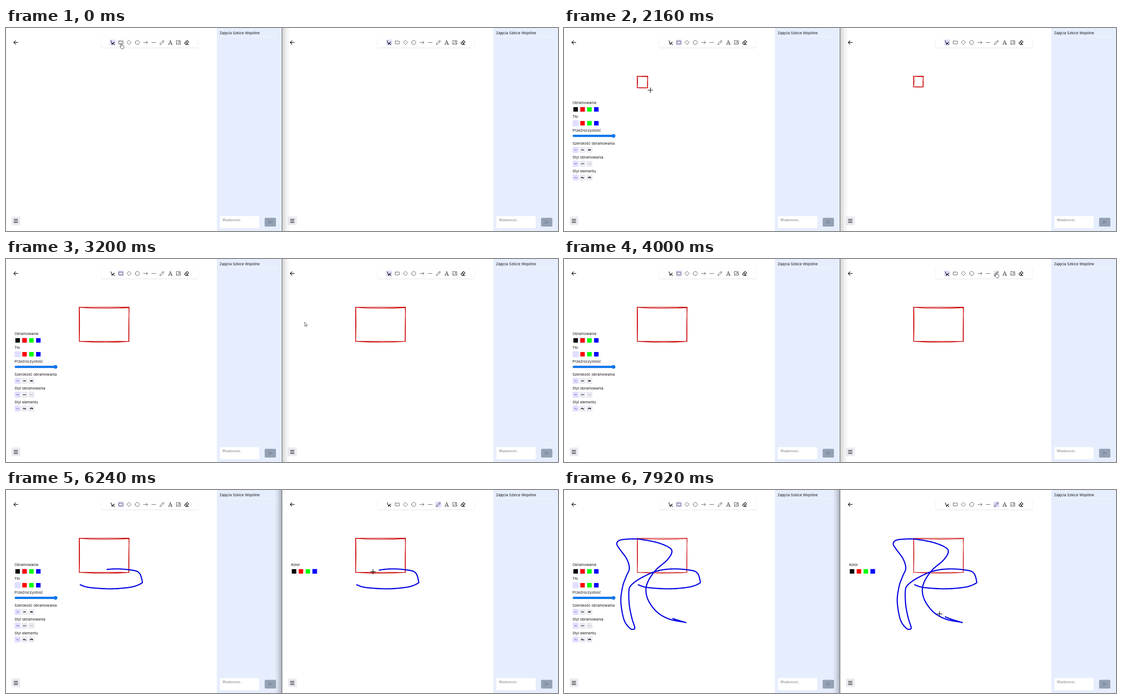
An HTML page that plays this animation: 1233 px wide and 454 px high, repeating every 8000 ms.

```html
<!DOCTYPE html>
<html lang="pl">
<head>
<meta charset="utf-8">
<title>Tablica</title>
<style>
html, body { margin: 0; width: 100%; height: 100%; overflow: hidden; background: #fff; }
svg { display: block; width: 1233px; height: 454px; }
text { font-family: Inter, "Open Sans", sans-serif; fill: #16161a; }
.icon { fill: none; stroke: #222; stroke-width: .75; stroke-linecap: round; stroke-linejoin: round; }
.bold { stroke: #000; stroke-width: 1.15; }
.violet { stroke: #5b57a2; }
</style>
</head>
<body>
<svg id="stage" viewBox="0 0 1233 454" xmlns="http://www.w3.org/2000/svg"></svg>
<script>
const LOOP = 8000, STEP = 80, SHIFT = 617.4;
const LILAC = '#e0dfff', GREY = '#ebebf2', BLUE = '#0d74ec';
const COLORS = ['#000', '#f00', '#0f0', '#00f'];
const stage = document.getElementById('stage');
const $ = id => document.getElementById(id);

// ---------- markup helpers ----------
const rect = (x, y, w, h, fill, more = '') =>
  `<rect x="${x}" y="${y}" width="${w}" height="${h}" fill="${fill}" ${more}/>`;
const tile = (cx, cy, fill, id = '') =>
  rect(cx - 6.7, cy - 6.7, 13.4, 13.4, fill, `rx="1.8" ${id && `id="${id}"`}`);
const label = (x, y, size, s, more = '') =>
  `<text x="${x}" y="${y}" font-size="${size}" ${more}>${s}</text>`;
const icon = (cx, cy, d, cls = '', more = '') =>
  `<path class="icon ${cls}" transform="translate(${cx} ${cy})" d="${d}" ${more}/>`;

const col = i => 26 + 15.4 * i;
const toolX = i => 238.2 + 18.36 * i;

const TOOLS = [
  ['M-3.8-4L-1 4.6L.5 1L4 5M.5 1L4.2-.8Z', 'bold'],
  ['M-4-3.2H4Q4.6-3.2 4.6-2.6V2.6Q4.6 3.2 4 3.2H-4Q-4.6 3.2-4.6 2.6V-2.6Q-4.6-3.2-4-3.2Z'],
  ['M0-4.8L4.8 0L0 4.8L-4.8 0Z'],
  ['M-4.6 0A4.6 4.6 0 1 1 4.6 0A4.6 4.6 0 1 1-4.6 0Z'],
  ['M-4.6 0H4.6M1.4-3.2L4.6 0L1.4 3.2'],
  ['M-4.6 0H4.6'],
  ['M-4.4 4.5L-3.8 1.6L2.3-4.3Q3.2-4.9 4.2-3.9Q4.9-3 4.2-2.2L-1.7 3.8ZM1-3L3-1'],
  ['M-4.4 4.4H-1.6M-3.2 4.4L0-4.6L3.2 4.4M.2-4.6L4 4.4M1 4.4H4.6M-2.2 1.4H2'],
  ['M-3.8-4.4H3.8Q4.5-4.4 4.5-3.7V3.7Q4.5 4.4 3.8 4.4H-3.8Q-4.5 4.4-4.5 3.7V-3.7Q-4.5-4.4-3.8-4.4ZM-4.3 3L-1.4.2L.6 2.2L2.2.8L4.4 2.8M.8-1.7A1 1 0 1 1 2.8-1.7A1 1 0 1 1 .8-1.7'],
  ['M-4.4 1L1.2-4.5L4.5-1.2L-.8 4.3H-2.2L-4.6 1.7ZM-2-1.4L1.8 2.2M-1 4.4H4.2', 'bold']
];

const swatches = (y, from, id) => COLORS.map((c, i) => i < from ? '' :
  (id ? tile(col(i), y, 'none', id + i) : '') + rect(col(i) - 5, y - 5, 10, 10, c)).join('');

function win(n) {
  const tools = TOOLS.map(([d, cls], i) =>
    tile(toolX(i), 32.4, 'none', `tool${n}_${i}`) + icon(toolX(i), 32.4, d, cls)).join('');
  return `<g transform="translate(${n * SHIFT} 0)">
    ${rect(471, 0, 145.2, 454, '#e6eefd')}
    ${label(477, 14.4, 8, 'Zajęcia Szkice Wspólne')}
    ${rect(477, 19, 130, 1, '#f3f6fe')}
    ${rect(478, 420.8, 87.5, 27, '#fff', 'rx="1.5"')}
    ${label(483.6, 432.2, 7.2, 'Wiadomość..', 'style="fill:#757575"')}
    ${rect(577.8, 424.4, 25.2, 19.6, '#94a1b5', 'rx="2.6"')}
    ${icon(590.4, 434.2, 'M-3.4-3.6L4.2 0L-3.4 3.6L-2.4 0ZM-2.4 0H1', '', 'style="stroke:#6c7789"')}
    ${icon(22, 32.4, 'M4.6 0H-4.4M-.6-4L-4.6 0L-.6 4', 'bold')}
    ${rect(12.4, 421.6, 19.6, 19.4, GREY, 'rx="1.5"')}
    ${icon(22, 431.5, 'M-4.2-3.4H4.2M-4.2 0H4.2M-4.2 3.4H4.2', 'bold')}
    ${rect(212.7, 21.5, 215.8, 22, '#fff', 'rx="3" filter="url(#soft)"')}
    ${tools}</g>`;
}

function leftPanel() {
  const row = (y, items) => items.map(([d, cls, more], i) =>
    tile(col(i), y, i ? GREY : LILAC) + icon(col(i), y, d, cls, more)).join('');
  const line = 'M-2.8 0H2.8', wave = 'M-3.2 1.2Q-1.4-2 0 0T3.2.4';
  const w = (n, more = '') => `style="stroke-width:${n};stroke-linecap:butt;${more}"`;
  return `<g id="panel0">
    ${label(19, 170.4, 8.15, 'Obramowanie')}${swatches(182, 0, 'ring0_')}
    ${label(19, 201.2, 8.15, 'Tło')}${tile(26, 213, LILAC)}${swatches(213, 1)}
    ${label(19, 232, 8.15, 'Przeźroczystość')}
    ${rect(19.4, 238.8, 95, 5, BLUE, 'rx="2.5"')}
    <circle cx="110.6" cy="241.3" r="4.1" fill="${BLUE}"/>
    ${label(19, 261, 8.15, 'Szerokość obramowania')}
    ${row(272.6, [[line, 'violet', w(.9)], [line, 'bold', w(1.5)], [line, 'bold', w(2.2)]])}
    ${label(19, 291.8, 8.15, 'Styl obramowania')}
    ${row(303.5, [[line, 'violet', w(1.2)], ['M-3.2 0H3.2', 'bold', w(1.3, 'stroke-dasharray:1.7 .7')],
      ['M-3.6 0H3.6', '', w(.9, 'stroke:#667;stroke-dasharray:1 1')]])}
    ${label(19, 322.6, 8.15, 'Styl elementu')}
    ${row(334.4, [[wave, 'violet', w(1)], [wave, 'bold', w(1.4)], ['M-3 1.4Q-1.6-1.8.8-1T2.8 1.2M.2.2H3', 'bold', w(1.5)]])}
  </g>`;
}

const rightPanel = () => `<g id="panel1" transform="translate(${SHIFT} 0)">
  ${label(19.3, 170.4, 8.15, 'Kolor')}${swatches(182, 0, 'ring1_')}</g>`;

const drawing = n => `<g transform="translate(${n * SHIFT} 0)" fill="none" stroke-linecap="round" stroke-linejoin="round">
  <path id="box${n}" stroke="#cc0808"/><path id="ink${n}" stroke="#0505e2" stroke-width="2.6"/></g>`;

const fade = (id, a, b) => `<linearGradient id="${id}"><stop offset="0" stop-color="#000" stop-opacity="${a}"/>
  <stop offset=".5" stop-color="#000" stop-opacity="${(a + b) / 3}"/><stop offset="1" stop-color="#000" stop-opacity="${b}"/></linearGradient>`;

stage.innerHTML = `<defs>
  <filter id="soft" x="-5%" y="-40%" width="110%" height="180%">
    <feDropShadow dx="0" dy=".8" stdDeviation="1.3" flood-color="#000" flood-opacity=".16"/></filter>
  ${fade('fadeRight', .18, 0)}${fade('fadeLeft', 0, .26)}</defs>
  ${rect(0, 0, 1233, 454, '#fff')}${win(0)}${win(1)}${leftPanel()}${rightPanel()}${drawing(0)}${drawing(1)}
  ${rect(617, 0, 18, 454, 'url(#fadeRight)', 'id="shadeRight"')}
  ${rect(600, 0, 16, 454, 'url(#fadeLeft)', 'id="shadeLeft"')}
  ${rect(616, 0, 1, 454, '#555')}
  <g id="cursor">
    <path id="hand" d="M-1 1V6.5L-2.2 5.3Q-3.2 5-3 6L-.8 9.6Q0 11 1.5 11H3.6Q5.6 11 5.7 8.8V5.2Q5.5 4 4.6 4.4Q4 3.4 3 4Q2.2 3.2 1.2 3.8V1Q.2-.4-1 1Z" fill="#fff" stroke="#222" stroke-width=".8"/>
    <path id="cross" d="M-6 0H6M0-6V6" stroke="#000" stroke-width="1.2"/>
    <path id="arrow" d="M0 0V9.2L2.1 7.3L3.4 10.2L4.8 9.6L3.5 6.8H6.4Z" fill="#fff" stroke="#333" stroke-width=".8"/>
  </g>`;

// ---------- motion ----------
// time, x, y, pointer shape until the next key
const POINTER = [
  [0, 257.5, 35.5, 'hand'], [240, 257.5, 35.5, 'hand'], [320, 245, 50, 'cross'], [560, 130, 130, 'cross'],
  [800, 45, 179, 'hand'], [960, 41.5, 182, 'hand'], [1280, 41.5, 182, 'hand'], [1360, 62, 168, 'cross'],
  [1680, 163.5, 108, 'cross'], [2080, 163.5, 108, 'cross'], [2160, 193, 139, 'cross'],
  [2400, 240, 167, 'cross'], [2720, 275, 183.5, 'cross'], [2880, 275, 183.5, 'cross'],
  [3040, 440, 165, 'arrow'], [3200, 667, 141, 'arrow'], [3440, 770, 122, 'arrow'], [3760, 930, 60, 'arrow'],
  [3920, 965.5, 33, 'hand'], [4000, 965.5, 31, 'hand'], [4240, 965.5, 31, 'hand'], [4320, 945, 50, 'cross'],
  [4720, 790, 135, 'cross'], [5040, 692.5, 185, 'hand'], [5280, 692.5, 187, 'hand'],
  [5440, 692.5, 187, 'hand'], [5520, 745, 201, 'cross'], [5600, 783.4, 212, 'cross']
];

const STROKE = [
  [166, 212], [186, 218], [235, 221], [280, 217], [302, 209], [304, 203], [298, 186], [283, 179.5],
  [243, 176.5], [205, 182], [170, 198], [150, 213], [145, 226], [146, 258], [152, 288], [158, 307],
  [155, 311.5], [147, 309], [134, 290], [127, 250], [131, 216], [139, 193], [146, 175], [140, 154],
  [125, 133], [118, 121], [123, 113], [140, 110], [167, 110], [206, 117], [234, 128], [241, 139],
  [230, 157], [205, 179], [188, 204], [183, 226], [190, 250], [209, 274], [236, 289], [268.5, 295.5],
  [268.5, 295.5], [242, 287], [221.5, 277.2]
];
// time, position of the pen as a point index
const PEN = [[5600, 0], [6400, 11.3], [6960, 21.1], [7280, 27.2], [7920, 42]];
const FINE = 12;

function spline(p) {
  const out = [], at = i => p[Math.max(0, Math.min(p.length - 1, i))];
  for (let i = 0; i < p.length - 1; i++)
    for (let k = 0; k < FINE; k++) {
      const u = k / FINE;
      out.push([0, 1].map(c => {
        const [a, b, d, e] = [at(i - 1)[c], at(i)[c], at(i + 1)[c], at(i + 2)[c]];
        return b + u * ((d - a) / 2 + u * (a - 2.5 * b + 2 * d - e / 2 + u * (1.5 * (b - d) + (e - a) / 2)));
      }));
    }
  return [...out, p[p.length - 1]];
}

const curve = spline(STROKE);
const dist = [0];
for (let i = 1; i < curve.length; i++)
  dist[i] = dist[i - 1] + Math.hypot(curve[i][0] - curve[i - 1][0], curve[i][1] - curve[i - 1][1]);
const PACE = PEN.map(([t, i]) => [t, dist[Math.round(i * FINE)]]);

function keyed(keys, t) {
  const n = keys.findIndex(k => k[0] > t);
  if (n === 0) return keys[0];
  if (n < 0) return keys[keys.length - 1];
  const a = keys[n - 1], b = keys[n], u = (t - a[0]) / (b[0] - a[0]);
  return a.map((v, i) => typeof v === 'number' ? v + (b[i] - v) * u : v);
}

function curveTo(len) {
  const n = dist.findIndex(d => d >= len);
  if (n < 1) return n ? curve : [curve[0]];
  const a = curve[n - 1], b = curve[n], u = (len - dist[n - 1]) / (dist[n] - dist[n - 1] || 1);
  return [...curve.slice(0, n), [a[0] + (b[0] - a[0]) * u, a[1] + (b[1] - a[1]) * u]];
}

// two loose passes along every side
function sketchBox(w, h) {
  const x = 163.6, y = 107.9, r = x + w, b = y + h, bow = Math.min(2.2, w / 45);
  return `M${x - .4} ${y}L${r} ${y - .2}M${x + .4} ${y + .2}Q${x + w * .45} ${y + 2 * bow} ${r} ${y + .8}
    M${r} ${y}Q${r - 1.4} ${y + h * .5} ${r - 1} ${b}M${r - .6} ${y + 1}Q${r - .2} ${y + h * .4} ${r - .4} ${b}
    M${r} ${b}L${x - .4} ${b - .5}M${r - .5} ${b}Q${x + w * .55} ${b + 1.6 * bow} ${x} ${b - .2}
    M${x} ${b}L${x - .2} ${y}M${x + .2} ${b - .4}Q${x + 1.4} ${y + h * .5} ${x + .4} ${y}`;
}

const show = (id, on) => $(id).setAttribute('display', on ? 'inline' : 'none');
const fills = (prefix, count, pick) => {
  for (let i = 0; i < count; i++) $(prefix + i).setAttribute('fill', pick(i));
};
const mark = (prefix, count, chosen, hovered = -1) =>
  fills(prefix, count, i => i === chosen ? LILAC : i === hovered ? GREY : 'none');

function draw(t) {
  mark('tool0_', 10, t < 160 ? 0 : 1, t < 160 ? 1 : -1);
  mark('tool1_', 10, t < 4160 ? 0 : 6, t >= 3920 ? 6 : -1);
  mark('ring0_', 4, t < 1280 ? 0 : 1);
  mark('ring1_', 4, t < 5120 ? 0 : 3);
  show('panel0', t >= 240);
  show('panel1', t >= 4160);
  show('shadeRight', t < 4080);
  show('shadeLeft', t >= 4080);

  // the shapes trail the pointer, a little more in one window than the other
  const pen = keyed(PACE, t)[1];
  [[16, 24], [21, 14.5]].forEach(([delay, behind], n) => {
    const [, x, y] = keyed(POINTER, Math.min(t, 2800) - delay);
    $('box' + n).setAttribute('d', t >= 2160 ? sketchBox(x - 163.5, y - 107) : '');
    $('box' + n).setAttribute('stroke-width', t < 6480 ? 1.4 : 1.05);
    const len = pen - behind;
    $('ink' + n).setAttribute('d', len > 0 ? 'M' + curveTo(len).map(p => p.map(v => v.toFixed(2)).join(' ')).join('L') : '');
  });

  let [, x, y, kind] = keyed(POINTER, t);
  if (t > 5600) {
    [x, y] = curveTo(pen).pop();
    x += SHIFT;
  }
  $('cursor').setAttribute('transform', `translate(${x} ${y})`);
  ['hand', 'cross', 'arrow'].forEach(k => show(k, k === kind));
}

const start = performance.now();
function tick() {
  const t = (performance.now() - start) % LOOP;
  draw(Math.floor(t / STEP) * STEP);
  requestAnimationFrame(tick);
}
tick();
</script>
</body>
</html>
```
